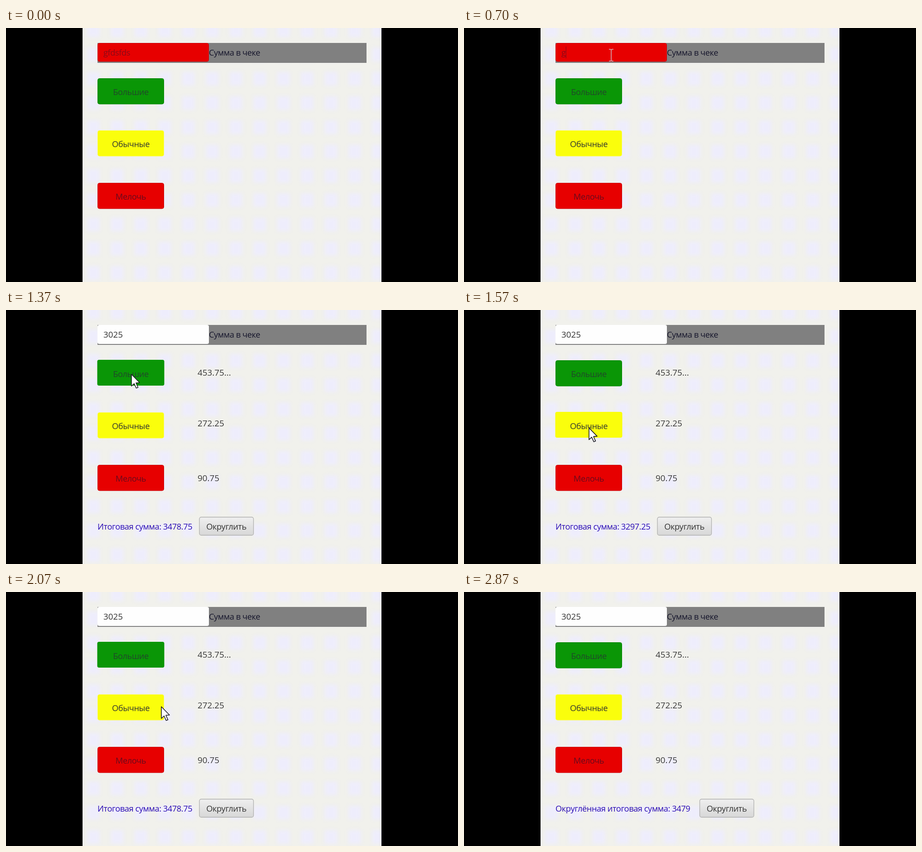
An HTML page with a canvas for the animation above (2910 ms loop, 998 by 561 pixels).

```html
<!DOCTYPE html>
<html lang="ru">
<head>
<meta charset="utf-8">
<title>Чаевые</title>
<style>
html, body { margin: 0; width: 100%; height: 100%; overflow: hidden; background: #000; }
canvas { display: block; }
</style>
</head>
<body>
<canvas id="stage" width="998" height="561"></canvas>
<script>
const LOOP = 2910;
const canvas = document.getElementById('stage');
const ctx = canvas.getContext('2d');
const FAMILY = '"Open Sans", "Noto Sans", sans-serif';

const tips = [
  { name: 'Большие', rate: 15, y: 111, labelY: 145, fill: '#0a9606', edge: '#078404', ink: '#21482a' },
  { name: 'Обычные', rate: 9, y: 226, labelY: 257, fill: '#fafe0c', edge: '#fbfb52', ink: '#333630' },
  { name: 'Мелочь', rate: 3, y: 342, labelY: 378, fill: '#e70000', edge: '#c90008', ink: '#6a0a1c' }
];

// [time, content of the field]
const typing = [[0, 'gfdsfds'], [530, 'gfdsfd'], [565, 'gfdsf'], [600, 'gfds'], [635, 'gfd'],
  [670, 'gf'], [700, 'g'], [735, ''], [770, '3'], [830, '30'], [870, '302'], [930, '3025']];

// [time, pressed button]; 3 is rounding
const clicks = [[1300, 0], [1530, 1], [1730, 2], [1980, 0], [2200, 3]];

// [time, x, y] of the pointer
const path = [[200, 325, 60], [1080, 325, 60], [1260, 277, 142], [1390, 277, 142],
  [1490, 276, 258], [1560, 276, 258], [1690, 275, 377], [1790, 275, 377],
  [1930, 277, 142], [2010, 277, 142], [2170, 480, 484], [2500, 480, 484]];

const last = (list, t) => list.filter(e => e[0] <= t).pop();

function pointerAt(t) {
  if (t < path[0][0] || t >= path[path.length - 1][0]) return null;
  const i = path.findIndex(p => p[0] > t);
  const [t0, x0, y0] = path[i - 1], [t1, x1, y1] = path[i];
  const k = (t - t0) / (t1 - t0), e = k * k * (3 - 2 * k);
  return [x0 + (x1 - x0) * e, y0 + (y1 - y0) * e];
}

function text(str, x, y, color, size = 18.8, spacing = 0, align = 'left') {
  ctx.font = `${size}px ${FAMILY}`;
  ctx.letterSpacing = spacing + 'px';
  ctx.textAlign = align;
  ctx.fillStyle = color;
  ctx.fillText(str, x, y);
  return ctx.measureText(str).width;
}

const words = (str, x, y, color, align) => text(str, x, y, color, 18.3, -0.45, align);

function box(x, y, w, h, r, fill, stroke, line = 1) {
  ctx.beginPath();
  ctx.roundRect(x, y, w, h, r);
  ctx.fillStyle = fill;
  ctx.fill();
  if (!stroke) return;
  ctx.lineWidth = line;
  ctx.strokeStyle = stroke;
  ctx.stroke();
}

function makePaper() {
  const paper = document.createElement('canvas');
  paper.width = 660;
  paper.height = 561;
  const p = paper.getContext('2d');
  p.fillStyle = '#f1f1ec';
  p.fillRect(0, 0, 660, 561);
  p.filter = 'blur(4px)';
  p.fillStyle = '#eeedfc';
  for (let x = 24; x < 680; x += 52.45)
    for (let y = 5; y < 580; y += 53.6) p.fillRect(x - 14, y - 15, 28, 30);
  return paper;
}
const paper = makePaper();

function drawField(value, caret) {
  const valid = /^\d+$/.test(value);
  ctx.fillStyle = '#808080';
  ctx.fillRect(202, 33, 594, 44);
  if (valid) box(202, 33, 246, 42, 4, '#fefefe');
  else box(202.5, 33.5, 245, 40.5, 4, '#e70000', '#c4040c');
  const ink = valid ? '#333' : '#8a0a18';
  const w = valid ? text(value, 215, 61, ink) : words(value, 215, 61, ink);
  if (caret) {
    ctx.fillStyle = valid ? '#444' : '#a00814';
    ctx.fillRect(215 + w, 41, 1.5, 26);
  }
  words('Сумма в чеке', 448, 61, '#15152b');
}

function drawTip(tip, focused) {
  if (focused) box(201.5, tip.y - 1, 148, 57, 4, tip.fill);
  else box(202.5, tip.y + 0.5, 146, 56.5, 4, tip.fill, tip.edge);
  words(tip.name, 275.5, tip.y + 36.5, tip.ink, 'center');
}

function drawTotal(str, x, focused) {
  words(str, 202, 485, '#2a0cb4');
  const g = ctx.createLinearGradient(0, 458, 0, 498);
  g.addColorStop(0, '#efefef');
  g.addColorStop(1, '#d7d7d7');
  if (focused) box(x + 0.5, 457.5, 120, 40.5, 4, g, '#2faad0', 2);
  else box(x + 0.5, 457.5, 119.5, 40, 4, g, '#aeaeae', 1.3);
  words('Округлить', x + 60, 485, '#333', 'center');
}

function drawBeam(x, y, light) {
  ctx.lineWidth = 1.6;
  ctx.strokeStyle = light ? '#d0b4bc' : '#222';
  ctx.beginPath();
  for (const s of [-1, 1]) {
    ctx.moveTo(x - 5, y + s * 13);
    ctx.lineTo(x - 1.5, y + s * 13);
    ctx.lineTo(x, y + s * 11.5);
    ctx.lineTo(x + 1.5, y + s * 13);
    ctx.lineTo(x + 5, y + s * 13);
  }
  ctx.moveTo(x, y - 11.5);
  ctx.lineTo(x, y + 11.5);
  ctx.stroke();
}

function drawArrow(x, y) {
  const pts = [[0, 0], [0, 26], [6, 20.5], [10.5, 30.5], [14.5, 29], [10, 19], [18, 18.5]];
  ctx.beginPath();
  for (const [dx, dy] of pts) ctx.lineTo(x + dx, y + dy);
  ctx.closePath();
  ctx.fillStyle = '#fff';
  ctx.fill();
  ctx.lineWidth = 1.6;
  ctx.lineJoin = 'round';
  ctx.strokeStyle = '#1c1c24';
  ctx.stroke();
}

function draw(t) {
  ctx.fillStyle = '#000';
  ctx.fillRect(0, 0, 998, 561);
  ctx.drawImage(paper, 169, 0);

  const value = last(typing, t)[1];
  const sum = /^\d+$/.test(value) ? +value : 0;
  const click = last(clicks, t);
  const focus = click && t < 2500 ? click[1] : -1;
  drawField(value, t >= 200 && t < 1300);

  tips.forEach((tip, i) => {
    drawTip(tip, focus === i);
    if (!sum) return;
    const part = sum * tip.rate / 100;
    text(part + (part > 400 ? '...' : ''), 423, tip.labelY, '#383838');
  });

  if (click) {
    const chosen = tips[last(clicks.filter(c => c[1] < 3), t)[1]];
    const total = sum + sum * chosen.rate / 100;
    if (click[1] === 3) drawTotal('Округлённая итоговая сумма: ' + Math.round(total), 520, focus === 3);
    else drawTotal('Итоговая сумма: ' + total, 426.5, false);
  }

  const pos = pointerAt(t);
  if (!pos) return;
  const [x, y] = pos;
  if (y < 76) drawBeam(x, y, !sum);
  else drawArrow(x, y);
}

const start = performance.now();
function tick() {
  draw((performance.now() - start) % LOOP);
  requestAnimationFrame(tick);
}
draw(0);
requestAnimationFrame(tick);
</script>
</body>
</html>
```
